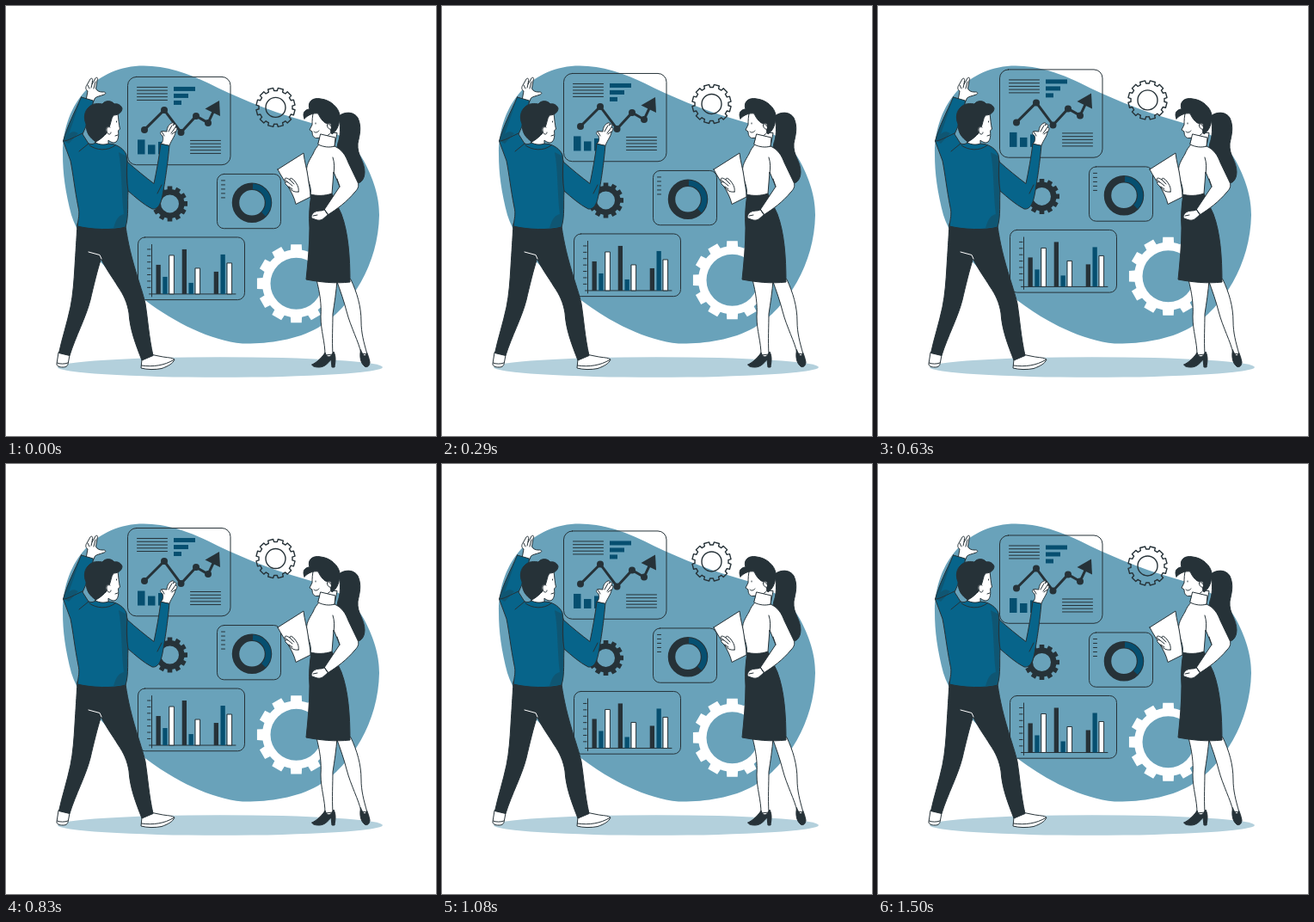
An HTML page for the animation above (1540 ms loop, 500 by 500 pixels).

```html
<!DOCTYPE html>
<html lang="en">
<head>
<meta charset="utf-8">
<title>Data analysis</title>
<style>
  html, body { margin: 0; width: 100%; height: 100%; overflow: hidden; background: #fff; }
  svg { display: block; width: 100vw; height: 100vh; }
  .ink { fill: #263238; }
  .blue { fill: #07648a; }
  .deep { fill: #064f70; }
  .sky { fill: #69a2ba; }
  .white { fill: #fff; }
  .line { fill: none; }
  .edge { stroke: #263238; stroke-width: 1; stroke-linejoin: round; stroke-linecap: round; }
  .shade { fill: #263238; opacity: .28; stroke: none; }
</style>
</head>
<body>
<svg viewBox="0 0 500 500">
  <path class="sky" d="M160 69.5C186 69.5 211 78 236 90C264 104 302 121 345 133C376 142 402 154 416 180C430 206 434 226 434 243C433 300 402 350 363 374C337 389 302 393 275 392.500C238 389 196 368 163 343C122 314 88 280 76 243C69 216 66 195 66 172C66 112 106 69.500 160 69.500Z"/>
  <ellipse cx="249" cy="420" rx="189" ry="11.8" fill="#b3d0dc"/>

  <g id="float">
    <g class="line edge">
      <rect x="141.5" y="82.5" width="119.5" height="102.3" rx="10"/>
      <rect x="245.5" y="195.5" width="74" height="63.3" rx="8"/>
      <rect x="153.5" y="269" width="124" height="72.7" rx="8"/>
      <path id="rules"/>
    </g>
    <g id="bars"></g>
    <g class="ink">
      <path class="line" stroke="#263238" stroke-width="3" d="M161 144L184 121L203.500 147L221 128L235 136L243 119"/>
      <path d="M248 110L249 128L231.500 119.500Z"/>
      <g id="dots"></g>
    </g>
    <circle class="line" cx="286" cy="228.800" r="19" stroke="#263238" stroke-width="8.500"/>
    <path class="line" stroke="#064f70" stroke-width="6.500" d="M287 209.800A19 19 0 0 1 299.500 242.200"/>
    <path id="gearInk" class="ink" fill-rule="evenodd"/>
    <path id="gearLine" class="line" stroke="#263238" stroke-width="1.4" stroke-linejoin="round"/>
    <path id="gearWhite" class="white" fill-rule="evenodd"/>
  </g>

  <g id="man" class="edge">
    <path class="white" d="M61 403L59 416C59 419 62 420 66 420C71 420 72 418 72.500 414L74 406Z"/>
    <path class="line" d="M59.500 415C63 416.500 68 416.500 72 415"/>
    <path class="white" d="M158 411L157 421C164 423 174 423 181 421.500C188 419 194 416 196 411C193 408.500 187 409 180 407.500L170 405.500Z"/>
    <path class="line" d="M157.500 418C171 420 184 418 195 411.500"/>
    <path class="ink" d="M83 253C82 272 81 286 80 303C79 320 78 335 75 350C71 369 65 387 61.500 403.500L74 406.500C81 384 93 362 98 342C102 325 106 308 110.500 294C117 307 124 316 130 326C137 336 141 345 143 357C144 376 151 394 158 412L171 406.500C166 384 165 365 162 346C157 324 145 298 139 256Z"/>
    <path class="line" style="stroke:#fff" d="M96 286L109 289.500L111 294"/>

    <path class="white" d="M93 110L95 99C92 97 92.500 94 94 92L98 85C100 83 101 85 100.500 87L100 91L104 84C106 82 107.500 84 106 87L104.500 96C106 99 109 100 112 100C116 99.500 117 102 114 103C109 105 106 105 103.500 107L101 113Z"/>
    <path class="line" d="M95 92L97 96M100 91L99 95M104 88L102 96"/>
    <path class="blue" d="M87.500 106L101.500 110C100 124 94 138 89 149L96 160C99 161 101 161 104 159L124 160.500C130 162 137 166 140 173L141 181C151 190 162 199 172 206.500C175 192 178 176 180 160L190 161.500C188 184 185 204 182 220C180 231 176 237 170 236C160 231 150 222 142 215C141 229 143 244 139 257C124 261 99 260 83 256C84 247 86 242 84 234C80 214 78 195 75 180L66.500 157C71 140 80 123 87.500 106Z"/>
    <path class="shade" d="M87.500 107C80 123 71 140 67 157L73 160L84 148C79 145 76 146 73 149Z"/>
    <path class="shade" d="M131 170C135 190 134 220 137 242C132 243 128 247 125 258L139 256.500C143 240 140 222 142 214L141 175Z"/>
    <path class="line" d="M67 157C72 157 80 152 89 148M96 160L85 169M141 180C140 190 140 204 142 215M97 162C105 168 118 169 127 162M181 208L176 218"/>
    <path class="white" d="M180.500 160C183 157 183 154 182 151C179 149 179 146 181.500 145.500L187 146C187 141 190 137 193 136C195 135 196 137 194 139C197 136 199 138 197 141C200 141 199 144 197 147C196 152 193 155 190 162Z"/>
    <path class="line" d="M181 146L184 151M193 139L189 146M197 141L192 148M197 146L193 149"/>

    <path class="white" d="M106 145L122 125L130 125C131 132 131 137 132.500 143L130.500 145C131 150 131 155 128 158C125 160 121 158 119 156L119 160C114 162 108 161 104 159Z"/>
    <path class="ink" d="M104.500 158C97 153 93 147 93 137C90 130 91 122 97 117C101 113 108 113 112 114C116 109 123 110 126 114C129 113 134 115 135 119C135 123 131 127 125 127C122 131 122 137 120 141C116 139 115 144 117 148C114 151 109 156 104.500 158Z"/>
    <path class="white" d="M121 141C117 139 116 144 118 148C120 150 122 149 122 147"/>
    <path class="line" d="M128.500 134V135M127 151L130 150"/>
  </g>

  <g id="woman" class="edge">
    <path class="white" d="M361 318C365 334 367 347 366 361C366 378 371 390 371 406L380 405C379 389 380 371 380 358C382 345 384 332 385 319Z"/>
    <path class="white" d="M384 318C389 332 393 343 396 355C401 374 410 390 413 404L420 405C416 391 413 380 413 367C413 349 408 333 401 318Z"/>
    <path class="ink" d="M356 417C362 414 368 408 371 403C374 411 378 408 381 402C384 408 383 413 382 420H379L378 411C374 416 370 420 364 420C359 420 356 419 356 417Z"/>
    <path class="ink" d="M412.500 400C411 407 412 415 417 419C420 421 423 418 423 414C422 409 421 406 419.500 403C418 410 415 406 412.500 400Z"/>

    <path class="ink" d="M387 128C393 123 404 122 409 130C414 141 411 150 409 160C408 174 417 180 417 193C417 202 412 207 405 207C407 197 400 188 393 183C383 176 384 164 387 156C389 148 389 139 387 128Z"/>
    <path class="white" d="M366 146L364 161L382 163L385 148Z"/>
    <path class="white" d="M358 121C356 128 356 134 356 138L353 144L356 146C356 151 358 154 362 153.500C369 153 374 152 378 147L385 136L376 117Z"/>
    <path class="ink" d="M347 131C344 124 348 120 353 120C350 111 357 106 366 108C377 109 387 118 388 127C388 138 385 145 379 149C377 146 377 143 378 140C379 137 376 135 374 137C370 136 366 132 363 125C357 124 351 127 347 131Z"/>
    <path class="white" d="M378 140C376 136 373 136 373.500 139C374 142 376 144 378 143"/>
    <path class="line" d="M360 136V137M358 146C360 148 362 147 364 145"/>

    <path class="ink" d="M355 219L379 218C383 226 386 234 390 242C398 263 400 292 400 321C382 323 365 321 349 318C351 298 353 278 353 258C352 244 353 231 355 219Z"/>
    <path class="white" d="M365 160C370 163 377 164 382 163C391 167 395 174 398 182L409 205C411 209 409 213 406 216C396 228 385 236 374 243L370 237L388 210L381 193L379 218C371 221 361 221 354 219C356 211 350 202 350 194C348 186 353 179 357 172C359 167 361 164 365 160Z"/>
    <path class="line" d="M381 195C382 188 382 182 380 176M388 210L385 201"/>
    <path class="white" d="M366 149L383 153L382 163C376 165 369 164 363 161Z"/>
    <path class="white" d="M374 243C370 246 368 250 362 249L356 247C354 245 356 242 358 240C362 237 367 239 370 237Z"/>
    <path class="line" d="M357 244L362 243M370 236L375 243"/>
    <path class="white" d="M316 190L346 171C347 181 350 190 351 198C352 207 354 214 354 222L337 230.500C334 216 323 204 316 190Z"/>
    <path class="white" d="M340 216C335 217 331 214 329 211L325 207C324 205 326 204 328 205L324 202C324 199 327 200 330 202C330 199 333 200 336 204C339 208 341 212 340 216Z"/>
    <path class="line" d="M328 205L333 209M330 202L335 207M329 210L333 213"/>
  </g>
</svg>
<script>
  const LOOP = 1540, STEP = 41.64, LAST = 36;
  const PEAK = 705, TRAVEL = 10.5, TOP = -9.7;
  const el = id => document.getElementById(id);

  const circle = (x, y, r) =>
    `M${x - r} ${y}a${r} ${r} 0 1 0 ${2 * r} 0a${r} ${r} 0 1 0 ${-2 * r} 0Z`;

  // A ring with twelve slightly tapered teeth and a round hole.
  function gear(x, y, tip, root, hole, turn = 0) {
    const pitch = Math.PI / 6, pts = [];
    const corners = [[-.32, root], [-.26, tip], [.26, tip], [.32, root], [.5, root]];
    for (let i = 0; i < 12; i++) {
      for (const [shift, r] of corners) {
        const a = (i + turn + shift) * pitch;
        pts.push(`${(x + r * Math.cos(a)).toFixed(2)} ${(y + r * Math.sin(a)).toFixed(2)}`);
      }
    }
    return `M${pts.join("L")}Z` + circle(x, y, hole);
  }

  function rules(x, y, width, gap, count) {
    let d = "";
    for (let i = 0; i < count; i++) d += `M${x} ${y + i * gap}h${width}`;
    return d;
  }

  const bar = (x, y, w, h, look) =>
    `<rect class="${look}" x="${x}" y="${y}" width="${w}" height="${h}"/>`;

  function build() {
    el("gearInk").setAttribute("d", gear(190.5, 230, 20.7, 17, 10.5));
    el("gearLine").setAttribute("d", gear(313.5, 118, 22.7, 19.5, 11.5, .5));
    el("gearWhite").setAttribute("d", gear(337.5, 322.8, 46, 39.5, 30));

    el("rules").setAttribute("d",
      rules(152.5, 94.5, 35, 3.75, 5) + rules(214.5, 156.5, 35, 3.75, 5) +
      rules(250.5, 203, 4, 5, 5) + rules(164.5, 283, 3.5, 7.4, 7) +
      "M169.500 277.500V338M166.500 335H267");

    let html = bar(195, 94, 25, 5, "deep") + bar(195, 102, 17, 5, "deep") + bar(195, 110, 9, 5, "deep") +
      bar(153, 155.5, 8.5, 17, "deep") + bar(165, 161.5, 8.5, 11, "deep") + bar(177, 158, 8.5, 14.5, "deep");
    const looks = ["ink", "deep", "white edge"];
    const sets = [[174.5, 301, 315, 290], [204.7, 283, 322, 305], [241.7, 309, 289, 299]];
    for (const [x, ...tops] of sets)
      tops.forEach((y, i) => html += bar(x + i * 7.8, y, 5.3, 335 - y, looks[i]));
    el("bars").innerHTML = html;

    el("dots").innerHTML = [[161, 144], [184, 121], [203.5, 147], [221, 128], [235, 136]]
      .map(([x, y]) => `<circle cx="${x}" cy="${y}" r="4"/>`).join("");
  }

  // Linear rise and fall, held at 24 steps per second.
  function draw(now) {
    const t = Math.min(LAST, Math.floor((now % LOOP + 4) / STEP)) * STEP;
    const gap = Math.abs(t - PEAK);
    const dist = Math.min(gap, LOOP - gap);
    const y = TOP + TRAVEL * dist / (LOOP / 2);
    el("float").setAttribute("transform", `translate(0 ${y.toFixed(3)})`);
  }

  build();
  const start = performance.now();
  draw(0);
  requestAnimationFrame(function tick(now) {
    draw(Math.max(0, now - start));
    requestAnimationFrame(tick);
  });
</script>
</body>
</html>
```
